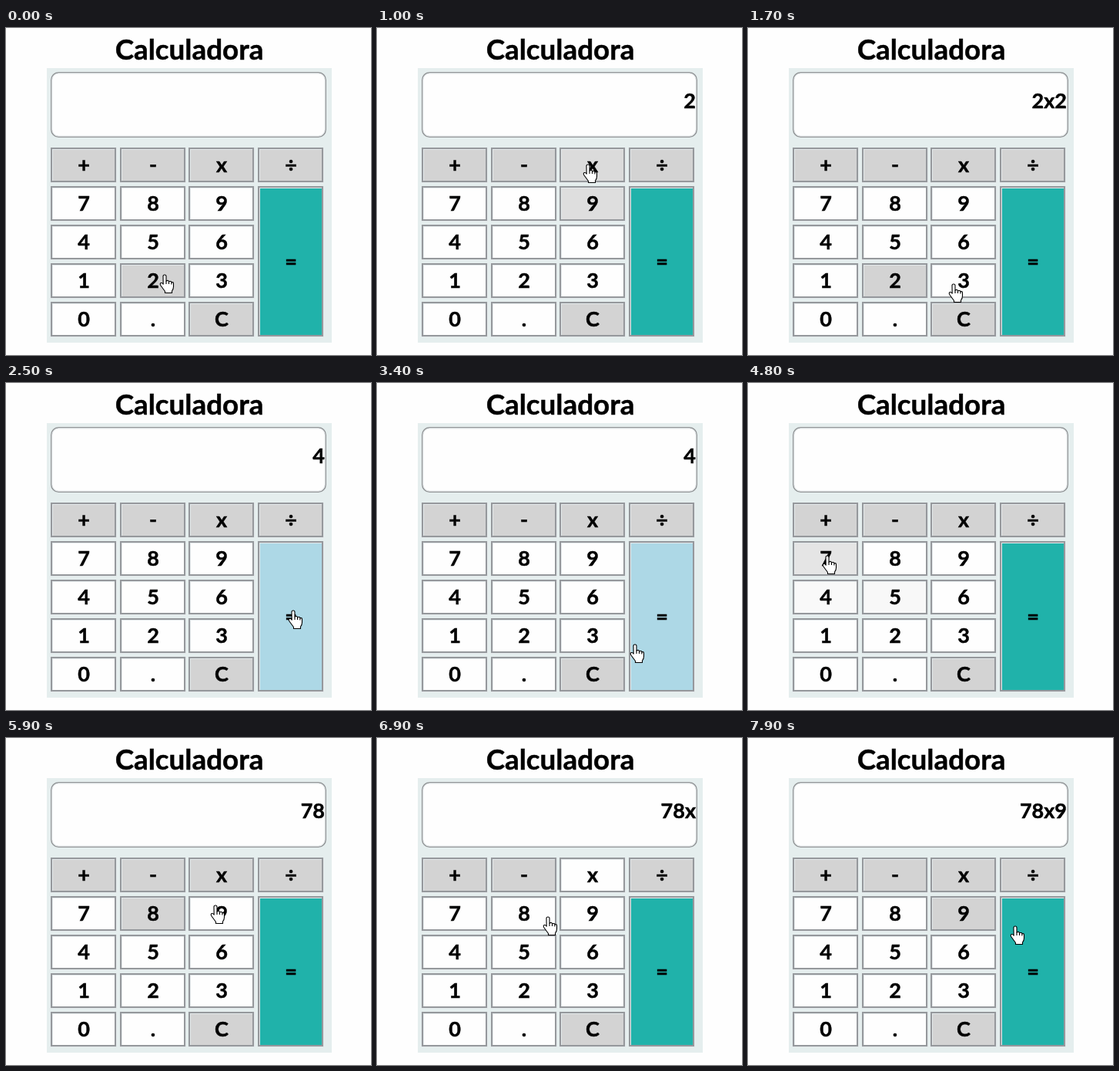
These frames come from a looping animation (474x424 px, 8000 ms). An HTML page:

```html
<!DOCTYPE html>
<html lang="es">
<head>
<meta charset="utf-8">
<title>Calculadora</title>
<style>
  html, body { margin: 0; height: 100%; overflow: hidden; background: #fefefe; }
  svg { display: block; width: 474px; height: 424px; }
  text {
    font: 700 27px Lato, Carlito, sans-serif; text-anchor: middle;
    stroke: #000; stroke-width: .5px;
  }
  #title { font-size: 36.8px; }
  #display { text-anchor: end; }
</style>
</head>
<body>
<svg viewBox="0 0 474 424">
  <text id="title" x="238" y="41">Calculadora</text>
  <rect x="53" y="52" width="370" height="356" fill="#e5eeee"/>
  <rect x="58.75" y="57.75" width="356.5" height="83.5" rx="9.5" fill="#fefefe" stroke="#929597" stroke-width="1.5"/>
  <rect x="60" y="59" width="354" height="81" rx="8.5" fill="none" stroke="#e3e8ea"/>
  <text id="display" x="414" y="104"></text>
  <g id="keys"></g>
  <g id="hand" fill="#fff" stroke="#000" stroke-width="1.1" stroke-linejoin="round">
    <path d="M-3 1a2 2 0 0 1 4 0V7q3-1.5 3.5.8q3-1 3.4 1q2.6-.8 2.6 1.7v4q0 3-2 5.5v2.5h-9v-2l-5.5-7.5q-1.6-2.6.2-3.4q1.6-.6 3 1.6z"/>
    <path d="M1 7v4M4.5 8v3M7.9 9v2.5" fill="none"/>
  </g>
</svg>
<script>
const LOOP = 8000, STEP = 100, LAG = 80, FADE = 250, SAMPLES = 25;
const WHITE = [254, 254, 254], GRAY = [211, 211, 211];
const TEAL = [32, 178, 170], BLUE = [173, 216, 230];
const $ = id => document.getElementById(id);

// Pointer rests: arrive, leave, x, y
const rests = [
  [0, 450, 207, 321], [950, 1200, 275, 178], [1400, 1600, 213, 332],
  [1700, 1700, 268, 333], [1950, 2500, 374, 296], [2700, 3300, 371, 313],
  [3560, 4150, 279, 383], [4700, 5150, 104, 225], [5350, 5700, 195, 222],
  [5900, 5900, 273, 218], [6200, 6780, 282, 175], [6900, 7050, 223, 233],
  [7250, 7700, 267, 225], [7900, LOOP, 348, 245]
];
const clicks = [
  [100, '2'], [1100, 'x'], [1500, '2'], [2300, '='], [3900, 'C'],
  [5000, '7'], [5500, '8'], [6400, 'x'], [7500, '9']
];

function add(tag, attrs) {
  const el = document.createElementNS('http://www.w3.org/2000/svg', tag);
  for (const k in attrs) el.setAttribute(k, attrs[k]);
  return $('keys').appendChild(el);
}

const box = (x, y, width, height, fill) => add('rect', { x, y, width, height, fill });

function makeKey(label, col, row) {
  const equals = label === '=';
  const x = Math.round(58 + col * 89.6), y = 155 + row * 50;
  const w = 85, h = equals ? 195 : 45;
  // Groove border: a dark and a light rim
  box(x, y, w + 1, h + 1, '#e3e8ea');
  box(x, y, w, h, '#95989c');
  box(x + 2, y + 2, w - 4, h - 4, '#e3e8ea');
  const face = box(x + 3, y + 3, w - 5, h - 5);
  add('text', { x: x + 43, y: equals ? 312 : y + 32 }).textContent = label;
  const [base, lit] = equals ? [TEAL, BLUE]
    : '+-x÷C'.includes(label) ? [GRAY, WHITE] : [WHITE, GRAY];
  const hit = ([px, py]) => px >= x && px < x + w && py >= y && py < y + h;
  return { face, base, lit, hit };
}

const keys = ['+-x÷', '789=', '456', '123', '0.C'].flatMap((line, row) =>
  [...line].map((label, col) => makeKey(label, col, row)));

const clamp = v => Math.min(1, Math.max(0, v));
const ease = p => p * p * (3 - 2 * p) * (1 - p) + (1 - (1 - p) ** 3) * p;

function pointer(t) {
  const next = rests.findIndex(r => r[0] > t);
  const i = next < 0 ? rests.length - 1 : Math.max(0, next - 1);
  const [, leave, x, y] = rests[i];
  const [arrive, , x2, y2] = rests[i + 1] ?? rests[i];
  const f = t <= leave ? 0 : clamp((t - leave) / (arrive - leave));
  return [x + (x2 - x) * f, y + (y2 - y) * f];
}

// Each past moment of hovering adds its share of the eased fade
function hoverLevels(t) {
  const levels = keys.map(() => 0);
  for (let k = 0; k < SAMPLES; k++) {
    const at = pointer(t - LAG - (k + .5) / SAMPLES * FADE);
    const i = keys.findIndex(key => key.hit(at));
    if (i >= 0) levels[i] += ease((k + 1) / SAMPLES) - ease(k / SAMPLES);
  }
  return levels;
}

function press(text, key) {
  if (key === 'C') return '';
  if (key === '=') return String(text.split('x').reduce((a, b) => a * b));
  return text + key;
}

function draw(now) {
  const t = Math.floor(now % LOOP / STEP) * STEP;
  hoverLevels(t).forEach((v, i) => {
    const { face, base, lit } = keys[i];
    face.setAttribute('fill', `rgb(${base.map((c, j) => Math.round(c + (lit[j] - c) * v))})`);
  });
  $('display').textContent = clicks.filter(c => c[0] <= t).reduce((s, c) => press(s, c[1]), '');
  $('hand').setAttribute('transform', `translate(${pointer(t).map(Math.round)})`);
}

let start;
function tick(now) {
  start ??= now;
  draw(now - start);
  requestAnimationFrame(tick);
}
draw(0);
requestAnimationFrame(tick);
</script>
</body>
</html>
```
